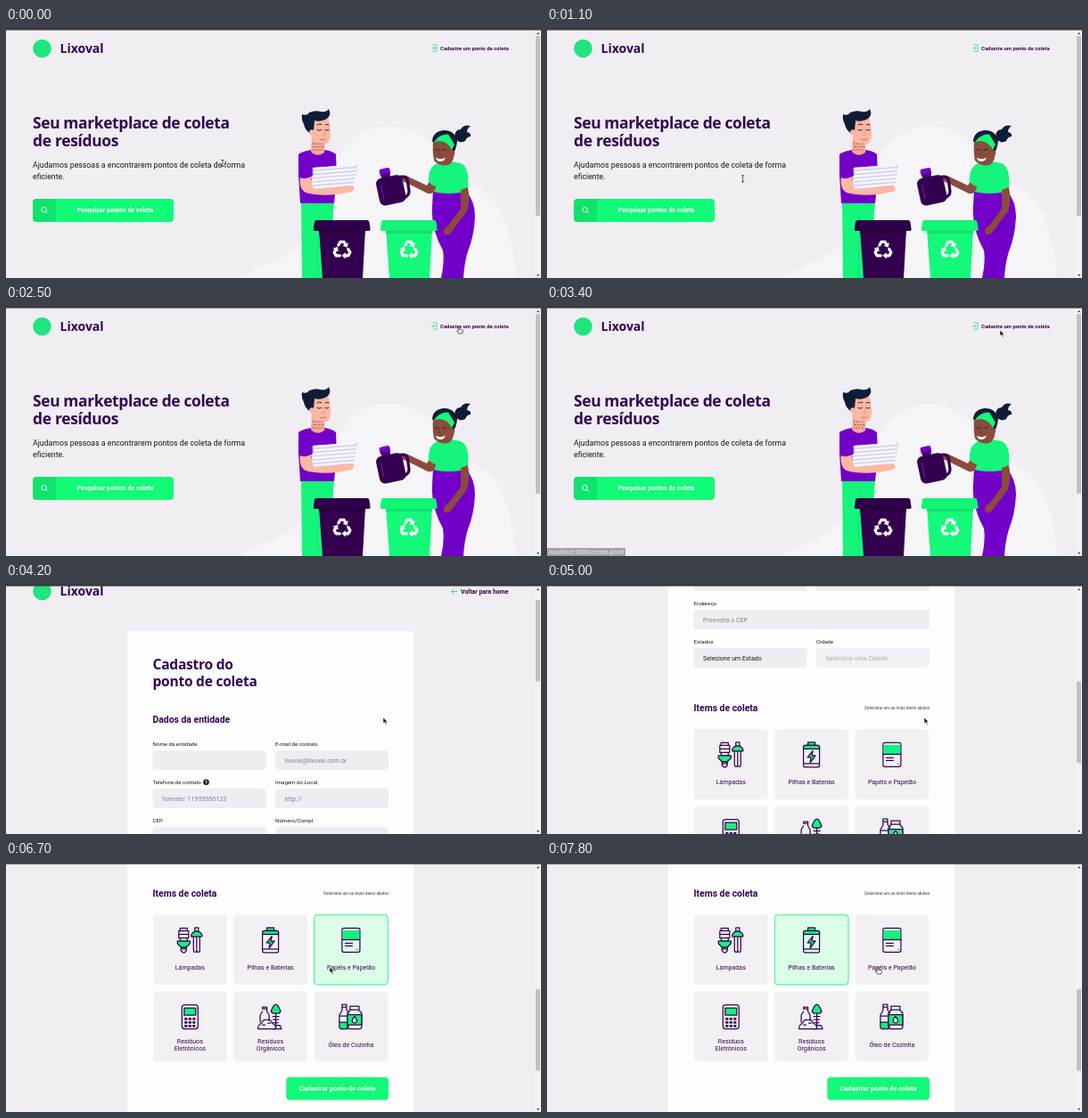
Animation of 600x281 px, one loop 8000 ms. Source, as an HTML page:

```html
<!DOCTYPE html>
<html lang="pt-BR">
<head>
<meta charset="utf-8">
<title>Ponto de coleta</title>
<style>
html, body { margin: 0; width: 100%; height: 100%; overflow: hidden; background: #f0eef2; }
svg { display: block; width: 100%; height: 100%; }
text { font-family: Roboto, sans-serif; white-space: pre; }
.h { font-family: "Noto Sans", sans-serif; font-weight: 700; fill: #320553; }
.b { font-weight: 700; }
.m { text-anchor: middle; }
.dark { fill: #320553; }
.ico { fill: none; stroke: #320553; stroke-width: 1.25; stroke-linejoin: round; stroke-linecap: round; }
.ico .g { fill: #16f07c; }
</style>
</head>
<body>
<svg id="stage" viewBox="0 0 600 281"></svg>
<script>
const GREEN = '#11fa78', PURPLE = '#7300c9', HAIR = '#0f1c38';
const PALE = '#fdb8a2', BROWN = '#8b4b3d', WHITE = '#fefdfe';

const text = (x, y, size, str, cls = '', extra = '') =>
  `<text x="${x}" y="${y}" font-size="${size}" class="${cls}" ${extra}>${str}</text>`;
const rect = (x, y, w, h, fill, r = 0, extra = '') =>
  `<rect x="${x}" y="${y}" width="${w}" height="${h}" rx="${r}" fill="${fill}" ${extra}/>`;
const path = (d, fill = 'none', extra = '') => `<path d="${d}" fill="${fill}" ${extra}/>`;
const line = (d, color, w) => path(d, 'none', `stroke="${color}" stroke-width="${w}" stroke-linecap="round" stroke-linejoin="round"`);
const dot = (x, y, r, fill) => `<circle cx="${x}" cy="${y}" r="${r}" fill="${fill}"/>`;
const group = (x, y, inner, extra = '') => `<g transform="translate(${x} ${y})" ${extra}>${inner}</g>`;

const brand = y => dot(40.5, y, 10.3, '#1fe57f') +
  text(60.5, y + 4.6, 14, 'Lixoval', 'h');

// ---------- landing page ----------
function recycle(x, y) {
  const arm = line('M-3.6-4.7L-1.8-7.8H1.8L3.1-5.6', '#fff', 2.8) + path('M5.9-7.2L.4-4L4.9-2.3Z', '#fff');
  return group(x, y, [0, 120, 240].map(a => `<g transform="scale(1.16) rotate(${a})">${arm}</g>`).join(''));
}

function bin(x, body, lid, shade) {
  return path(`M${x + 6} 226H${x + 58}L${x + 55} 281H${x + 10}Z`, body) +
    path(`M${x + 6} 228H${x + 58}L${x + 57.7} 231H${x + 6.3}Z`, shade) +
    path(`M${x + 3} 216H${x + 60}Q${x + 62} 216 ${x + 62.4} 218L${x + 63.6} 226Q${x + 64} 228 ${x + 62} 228H${x + 1.4}Q${x - .6} 228 ${x - .2} 226L${x + 1} 218Q${x + 1.4} 216 ${x + 3} 216Z`, lid) +
    recycle(x + 32, 249.5);
}

function man() {
  let sheets = path('M343 157L394 154L390 177L342 183Z', '#d3d1ea');
  for (let y = 157; y < 180; y += 4.2) sheets += path(`M344 ${y}L394 ${y - 4}L391 ${y - 1.2}L342 ${y + 2.8}Z`, '#f6f5fc');
  return path('M331 194H368L365 240L360 281H332Z', '#16f57b') +
    line('M351 208L349 281', '#12d96c', .7) +
    path('M329 141Q335 138 342 137Q349 145 357 137Q366 138 370 142L371 168L368 197H330L328 165Z', PURPLE) +
    path('M343 122H358L357 140Q349 146 342 139Z', '#f7a895') +
    path('M341 104Q342 98 350 98L362 102L364 116Q365 130 356 131Q345 131 342 120Z', PALE) +
    path('M342 119Q335 115 334 108Q331 103 332 97Q338 99 340 95Q347 92 353 94Q359 95 362 91Q366 99 358 103Q351 106 346 104L345 115Z', HAIR) +
    dot(343, 117, 2.8, PALE) +
    line('M349 109q2-2 5-.6M358 109q2-1.6 4-.4M349 114.5q2 1.6 4.5 0M358 114.5q2 1.4 4 0', HAIR, .9) +
    line('M356 114L358 120L355 120.5', '#e6897c', .8) +
    line('M352 125q3 2 7 0', '#c9655f', .9) +
    path('M344 130h13M345 133.5h12M344 137h12', 'none', 'stroke="#3b2b45" stroke-width="1" stroke-dasharray="1 2.2"') +
    sheets +
    path('M330 166Q328 181 336 185Q350 189 372 187L388 184Q393 180 388 177L376 178L346 182Q342 176 342 166Z', PALE) +
    path('M328 142Q334 139 340 146L344 166Q335 172 328 167Z', PURPLE) +
    line('M343 149L344 164', '#5b00a4', .8);
}

function woman() {
  return path('M503 123Q503 114 510 114Q513 108 521 110Q517 113 517 117Q522 118 521 122Q517 122 515 127Q508 131 503 123Z', HAIR) +
    path('M484 145H498L499 161H485Z', '#753c32') +
    path('M479 182H515Q526 194 526 212Q525 234 518 251Q514 264 513 281H488Q492 264 490 250Q476 225 478 200Z', PURPLE) +
    line('M502 240Q498 258 499 281', '#5b00a4', .8) +
    path('M484 152Q476 154 474 170L479 184Q495 188 515 184L518 179Q520 157 510 152L499 150Q494 157 487 152Z', '#16f47c') +
    path('M510 182L518 179Q521 195 517 206L499 230Q493 235 491 230Q490 225 497 221L510 203Z', BROWN) +
    path('M475 172L484 174L480 184Q476 188 471 185L449 174Q443 173 444 168Q446 164 451 167L472 177Z', BROWN) +
    path('M474 169Q474 156 483 154L487 163L484 178Q478 178 474 173Z', '#16f47c') +
    path('M479 126Q487 120 499 125L503 137Q503 151 496 154Q486 156 480 149Q478 140 479 126Z', BROWN) +
    path('M478 128Q478 117 490 115Q503 114 506 127Q505 137 501 141L499 129Q489 124 478 128Z', HAIR) +
    path('M480 128Q486 119 496 119.5L503 131L500 137Q495 127 486 127Z', GREEN) +
    dot(501, 140, 2.4, BROWN) +
    line('M481.5 137q2-1.5 4 0M490 137q2-1.5 4 0', HAIR, .8) +
    line('M487 138L485 142.5L488 143', '#683329', .8) +
    path('M482 146Q488 148.5 493 145.5Q491 150.5 487 150Q483 150 482 146Z', '#fff');
}

const jug = () => `<g transform="rotate(-12 431 181)">` +
  rect(423, 157, 12, 8, PURPLE, 2) + rect(424, 163, 10, 6, '#4a0570') +
  rect(416.5, 167, 30, 31, '#330050', 6) +
  line('M438 170.5Q451 168 452 175L451 188Q450 193 443 194', '#330050', 3.2) +
  rect(421, 174, 1.2, 17, '#64208a', .6) + '</g>';

const landing = path('M262 281C300 258 336 257 350 205C365 150 385 109 430 110C478 112 492 155 530 180C558 194 568 236 572 281Z', '#f5f4f7') +
  brand(23) +
  line('M479 18.8H483.2V26.2H479M477.3 22.5H481M479.4 20.8L481 22.5L479.4 24.2', '#2de48a', .8) +
  text(487, 24.7, 5.95, 'Cadastre um ponto de coleta', 'b dark') +
  text(30, 112.5, 17.4, 'Seu marketplace de coleta', 'h', 'letter-spacing="-.36"') +
  text(30, 133, 17.4, 'de resíduos', 'h', 'letter-spacing="-.3"') +
  text(30, 157, 8.78, 'Ajudamos pessoas a encontrarem pontos de coleta de forma', '', 'fill="#19171c"') +
  text(30, 170, 8.78, 'eficiente.', '', 'fill="#19171c"') +
  rect(30, 192, 158, 26, GREEN, 4, 'id="search"') +
  path('M56 192H34a4 4 0 0 0-4 4V214a4 4 0 0 0 4 4H56Z', 'rgba(0,0,0,.09)') +
  line('M44.8 206.3L46.5 208M45.4 204.2a2.8 2.8 0 1 1-5.6 0a2.8 2.8 0 1 1 5.6 0', '#fff', .9) +
  text(122.5, 207, 7, 'Pesquisar pontos de coleta', 'b m', 'fill="#fff"') +
  man() + woman() + jug() +
  bin(345, '#33004e', '#2f004a', '#28003f') + bin(420, '#14f97a', '#12f576', '#10e06c');

// ---------- form page ----------
function field(x, row, w, label, hint = '', color = '#85838c', fade = 1) {
  const y = 210 + row * 43;
  return text(x, y, 6.15, label, '', 'fill="#19171c"') +
    rect(x, y + 5, w, 22, '#efedf2', 4, `opacity="${fade}"`) +
    text(x + 10.5, y + 18.5, 7.05, hint, '', `fill="${color}"`);
}

const g = d => `<path class="g" d="${d}"/>`;
const p = d => `<path d="${d}"/>`;
let keys = '';
for (let i = 0; i < 9; i++) keys += p(`M${8.5 + i % 3 * 4.5} ${15.5 + (i / 3 | 0) * 4}h2v1.6h-2z`);

const items = [
  [['Lâmpadas'], p('M3 .5h8v3H3zM1.5 3.5h11v4h-11zM1.5 7.5h11v4h-11zM3 11.5h8v3.5H3z') +
    g('M0 15h14v3l-4 4H4l-4-4z') + p('M4 22h6v4l-2 2H6l-2-2zM4 24h6') +
    p('M19.5 0h4v4h-4z') + g('M15.5 10V8q2-4 6-4t6 4v2z') +
    p('M18 10v15q0 2.5 1.8 2.5T21.5 25V10M21.5 25q0 2.5 1.8 2.5T25 25V10')],
  [['Pilhas e Baterias'], p('M7 3.5h14q2 0 2 2V26q0 2-2 2H7q-2 0-2-2V5.5q0-2 2-2zM5 24h18') +
    g('M10 0h8v3.5h-8z') + g('M5 7.5V5.5q0-2 2-2h14q2 0 2 2v2z') + g('M15.5 9.5L9.5 17h4l-1 6 6-8h-4z')],
  [['Papéis e Papelão'], p('M6 .5h16q2 0 2 2v23q0 2-2 2H6q-2 0-2-2v-23q0-2 2-2z') +
    `<path d="M4.6 3h18.8v10.5H4.6z" fill="#16f07c" stroke="none"/>` + p('M4 13.5h20M7.5 17.5h8M7.5 20.5h8M21 24.5h.2')],
  [['Resíduos', 'Eletrônicos'], p('M8 .5h12q3 0 3 3v21q0 3-3 3H8q-3 0-3-3v-21q0-3 3-3z') + g('M7.5 4h13v8h-13z') + keys],
  [['Resíduos', 'Orgânicos'], p('M5 5h5v3l2.5 4v6M5 8l-2.5 4v8M5 5V3h5v2') +
    p('M0 27.5q0-5 4-6 1-5 6-4 5-1 6 4 4 1 4 6zM5 23h3M11 21h3') +
    g('M14.5 8q3-8 5.5-8t5.5 8l-2 2h-7z') + p('M20 10v17.5M16.5 13.5h7M17 17h6M17.5 20.5h5M16.5 27.5h10l-2-4h-5')],
  [['Óleo de Cozinha'], g('M1 20h10v6l-1.5 1.5h-7L1 26z') + p('M4 0h5v3H4zM4 3v4l-3 5v8M9 3v3l2.5 4M1 13h8') +
    p('M13 2h10v4H13zM13.5 6l-3.5 4v15q0 2.5 2.5 2.5h11q2.5 0 2.5-2.5V10L22.5 6z') + g('M10 11.5h16v11.5H10z') +
    `<path d="M18 13.5q-3.2 4-2.6 5.5a2.7 2.7 0 0 0 5.2 0q.6-1.5-2.6-5.5z" fill="#fff"/>`]
];

function card([names, icon], i) {
  const x = 165 + i % 3 * 90.3, y = 478.2 + (i / 3 | 0) * 86.2;
  const top = names.length > 1 ? 58.3 : 62.3;
  return group(x, y, rect(0, 0, 82.7, 78.8, '#f2f0f2', 4, `id="card${i}"`) +
    group(27.3, 14.6, icon, 'class="ico"') +
    names.map((n, k) => text(41.3, top + k * 8.2, 7.05, n, 'm dark')).join(''));
}

const form = brand(36) +
  line('M506 36.5H499.5M502.5 33.5L499.5 36.5L502.5 39.5', '#2de48a', 1) +
  text(510, 39, 6.95, 'Voltar para home', 'b dark') +
  rect(136, 81, 321, 680, WHITE, 2) +
  text(164.5, 124, 15.5, 'Cadastro do', 'h', 'letter-spacing="-.22"') +
  text(164.5, 142.7, 15.5, 'ponto de coleta', 'h', 'letter-spacing="-.22"') +
  text(164.5, 184, 10.4, 'Dados da entidade', 'b dark') +
  field(164.5, 0, 127, 'Nome da entidade') +
  field(302, 0, 127, 'E-mail de contato', 'lixoval@lixoval.com.br') +
  field(164.5, 1, 127, 'Telefone de contato', 'formato: 11955550123') +
  dot(224.5, 250.8, 3.3, '#17121c') + text(224.5, 253, 5.8, '?', 'b m', 'fill="#fff"') +
  field(302, 1, 127, 'Imagem do Local', 'http://') +
  field(164.5, 2, 127, 'CEP', 'formato: 00000') +
  field(302, 2, 127, 'Número/Compl.') +
  field(164.5, 3, 264.5, 'Endereço', 'Preencha o CEP') +
  field(164.5, 4, 127, 'Estados', 'Selecione um Estado', '#19171c') +
  field(302, 4, 127, 'Cidade', 'Selecione uma Cidade', '#b0aeb4', .75) +
  text(164.5, 458, 10.4, 'Items de coleta', 'b dark') +
  text(429, 456.3, 4.6, 'Selecione um ou mais items abaixo', 'b', 'text-anchor="end" fill="#77747c"') +
  items.map(card).join('') +
  rect(314.3, 661, 114.7, 25.5, GREEN, 4) +
  text(371.6, 676, 7.45, 'Cadastrar ponto de coleta', 'b m', 'fill="#fff"');

// ---------- browser frame and pointers ----------
const pointers = {
  beam: line('M-1.3-3.5H1.3M-1.3 3.5H1.3M0-3.5V3.5', '#222', .7),
  arrow: path('M0 0V6.6L1.6 5.3L2.8 8L4 7.5L2.9 4.9H5Z', '#1b1b1b', 'stroke="#fff" stroke-width=".5"'),
  hand: path('M-.7.5Q0-.5.8.5V3L3.8 3.8Q4.6 4.2 4.4 5.2L3.6 8H0L-2.4 5Q-2.2 3.9-.7 5Z', '#fff', 'stroke="#1b1b1b" stroke-width=".7"')
};

const stage = document.getElementById('stage');
stage.innerHTML = rect(0, 0, 600, 281, '#f0eef2') +
  `<g id="landing">${landing}</g><g id="form">${form}</g>` +
  rect(593, 2, 7, 279, '#f3f2f3') + rect(594, 9, 5, 202, '#c2c0c2', 0, 'id="thumb"') +
  path('M595 7L596.7 4.8L598.4 7ZM595 277L596.7 279.2L598.4 277Z', '#504d52') +
  rect(0, 0, 600, 2.5, '#3b383c') +
  `<g id="status">${rect(0, 272, 88, 9, '#a3a1a6', 1)}${text(2, 278.8, 6.6, 'localhost:3000/create-point', '', 'fill="#f4f4f6" style="font-family:Noto Sans,sans-serif"')}</g>` +
  Object.keys(pointers).map(k => `<g id="${k}">${pointers[k]}</g>`).join('');

const $ = id => document.getElementById(id);
const show = (id, on) => $(id).setAttribute('visibility', on ? 'visible' : 'hidden');
const clamp = v => Math.max(0, Math.min(1, v));
const ramp = (t, a, b) => clamp((t - a) / (b - a));

// time, x, y, pointer used from then on
const track = [
  [0, 243, 152, 'beam'], [800, 243, 152, 'beam'], [1250, 208, 178, 'arrow'], [1550, 173, 197, 'hand'],
  [1700, 167, 201, 'hand'], [1900, 167, 201, 'hand'], [2000, 205, 180, 'arrow'], [2500, 508, 23, 'hand'],
  [3300, 508, 23, 'hand'], [3400, 508, 27, 'arrow'], [3600, 508, 27, 'arrow'], [4000, 423, 150, 'arrow'],
  [5600, 423, 150, 'arrow'], [5800, 405, 132, 'hand'], [6100, 376, 118, 'hand'], [6600, 376, 118, 'hand'],
  [6700, 363, 118, 'arrow'], [6800, 342, 117, 'arrow'], [6900, 322, 117, 'hand'], [7000, 310, 117, 'hand'],
  [7400, 310, 117, 'hand'], [7800, 371, 118, 'hand'], [8000, 371, 118, 'hand']
];

function scrollAt(t) {
  if (t < 4200) return 28 * ramp(t, 4100, 4200);
  if (t < 5000) return 28 + 287 * ramp(t, 4200, 5000);
  const u = 1 - ramp(t, 5000, 5500);
  return 315 + 104 * (1 - u ** 1.7);
}

function movePointer(t) {
  let i = track.length - 2;
  while (track[i][0] > t) i--;
  const [t0, x0, y0, kind] = track[i], [t1, x1, y1] = track[i + 1];
  const u = ramp(t, t0, t1);
  for (const k in pointers) show(k, k === kind);
  $(kind).setAttribute('transform', `translate(${x0 + (x1 - x0) * u} ${y0 + (y1 - y0) * u})`);
}

function select(i, on) {
  const c = $('card' + i);
  c.setAttribute('fill', on ? '#dcfde7' : '#f2f0f2');
  c.setAttribute('stroke', on ? '#35ec90' : 'none');
}

function draw(t) {
  const home = t < 3500, s = scrollAt(t);
  show('landing', home);
  show('form', !home);
  show('status', t >= 2600 && t < 3700);
  $('form').setAttribute('transform', `translate(0 ${-s})`);
  $('thumb').setAttribute('y', home ? 9 : 9 + .32 * s);
  $('thumb').setAttribute('height', home ? 202 : 91.5);
  const hover = ramp(t, 1500, 1700) - ramp(t, 1900, 2100);
  const mix = (a, b) => Math.round(a + (b - a) * hover);
  $('search').setAttribute('fill', `rgb(${mix(17, 20)},${mix(250, 211)},${mix(120, 180)})`);
  select(2, t >= 6100 && t < 7800);
  select(1, t >= 7300);
  movePointer(t);
}

const start = performance.now();
function tick() {
  const t = (performance.now() - start) % 8000;
  draw(Math.floor(t / 100) * 100);
  requestAnimationFrame(tick);
}
draw(0);
requestAnimationFrame(tick);
</script>
</body>
</html>
```
